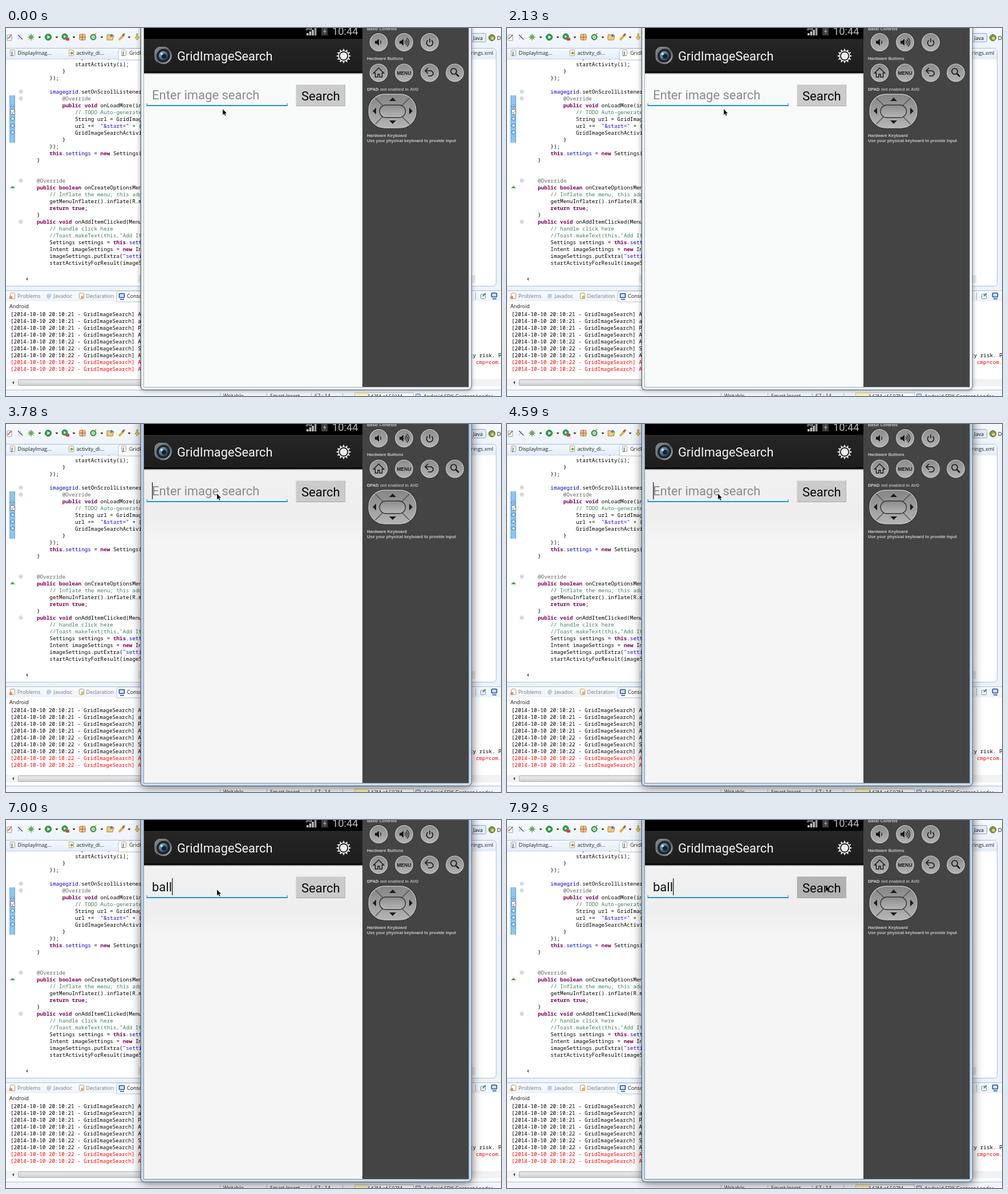
An HTML page with a canvas for the animation above (8000 ms loop, 868x645 px).

```html
<!DOCTYPE html>
<html lang="en">
<head>
<meta charset="utf-8">
<title>Image search</title>
<style>
html, body { margin: 0; width: 100%; height: 100%; overflow: hidden; background: #f1f5fa; }
canvas { display: block; }
</style>
</head>
<body>
<canvas id="stage" width="868" height="645"></canvas>
<script>
const g = document.getElementById('stage').getContext('2d');
const UI = '9.1px "Open Sans", sans-serif';
const MONO = '9.3px "Noto Sans Mono", monospace';
const APP = '22px Roboto, sans-serif';
const LABEL = 'bold 7.4px "Liberation Sans", sans-serif';
const CHAR = 5.58;

const box = (x, y, w, h, fill) => { g.fillStyle = fill; g.fillRect(x, y, w, h); };
const shape = (fill, stroke, width = 1) => {
  if (fill) { g.fillStyle = fill; g.fill(); }
  if (stroke) { g.strokeStyle = stroke; g.lineWidth = width; g.stroke(); }
};
const round = (x, y, w, h, r, fill, stroke, width) => {
  g.beginPath(); g.roundRect(x, y, w, h, r); shape(fill, stroke, width);
};
const disc = (x, y, r, fill, stroke, width) => {
  g.beginPath(); g.arc(x, y, r, 0, 7); shape(fill, stroke, width);
};
const poly = (x, y, points, fill, stroke, width, open) => {
  g.beginPath();
  for (let i = 0; i < points.length; i += 2) g.lineTo(x + points[i], y + points[i + 1]);
  if (!open) g.closePath();
  shape(fill, stroke, width);
};
const line = (x1, y1, x2, y2, stroke, width) => poly(x1, y1, [0, 0, x2 - x1, y2 - y1], null, stroke, width, true);
const text = (s, x, y, fill, font) => { g.font = font; g.fillStyle = fill; g.fillText(s, x, y); };
const fade = (x1, y1, x2, y2, ...colors) => {
  const f = g.createLinearGradient(x1, y1, x2, y2);
  colors.forEach((c, i) => f.addColorStop(i / (colors.length - 1), c));
  return f;
};

// Each row: indent in characters, then the code
const code = `16 startActivity(i);
12 }
8 });

8 imagegrid.setOnScrollListener(
12 @Override
12 public void onLoadMore(int
16 // TODO Auto-generated
16 String url = GridImage
16 url +=  "&start=" + (
16 GridImageSearchActivi
12 }
8 });
8 this.settings = new Settings(
4 }


4 @Override
4 public boolean onCreateOptionsMenu
8 // Inflate the menu; this adds
8 getMenuInflater().inflate(R.me
8 return true;
4 }
4 public void onAddItemClicked(MenuI
8 // handle click here
8 //Toast.makeText(this,"Add Item
8 Settings settings = this.setti
8 Intent imageSettings = new Int
8 imageSettings.putExtra("settin
8 startActivityForResult(imageSe`.split('\n');

const TOKEN = /\/\/.*|"[^"]*"?|@\w+|\b(?:public|void|boolean|return|true|this|new)\b|imagegrid|\.setti(?:ngs)?\b|[^\s"\/@]\w*|\S/g;
function codeStyle(s) {
  if (s.startsWith('//')) return ['#3f7f5f', ''];
  if (s[0] === '"') return ['#2a00ff', ''];
  if (s[0] === '@') return ['#646464', ''];
  if (/^(public|void|boolean|return|true|this|new)$/.test(s)) return ['#7f0055', 'bold '];
  if (/^(imagegrid|\.setti(ngs)?)$/.test(s)) return ['#0000c0', ''];
  return ['#000', ''];
}

function codeRow(row, y) {
  const [, indent, body] = row.match(/^(\d+) (.*)/) || [];
  if (!body) return;
  for (const m of body.matchAll(TOKEN)) {
    const [color, weight] = codeStyle(m[0]);
    text(m[0], 31.7 + (+indent + m.index) * CHAR, y, color, weight + MONO);
  }
}

function toolbar() {
  box(0, 0, 868, 35, fade(0, 0, 0, 35, '#f6f9fd', '#eef3fa'));
  round(2, 12, 8, 10, 1, '#fff', '#79a58a');
  line(3, 19, 10, 12, '#d33', 1.5);
  line(21, 12, 29, 20, '#334a70', 1.3);
  line(21, 20, 26, 12, '#8fa7cc');
  for (let a = 0; a < 4; a++) {
    const c = 6 * Math.cos(a * Math.PI / 4), s = 6 * Math.sin(a * Math.PI / 4);
    line(44 - c, 16 - s, 44 + c, 16 + s, '#47753f');
  }
  disc(44, 16, 3.5, '#6fab4d');
  disc(74, 16, 5.5, '#35a046', '#1e7f32');
  poly(72.5, 13, [0, 0, 5, 3, 0, 6], '#fff');
  disc(103, 15, 5, '#35a046', '#1e7f32');
  poly(101.5, 12.5, [0, 0, 4, 2.5, 0, 5], '#fff');
  box(105, 17, 6, 5, '#cf4540');
  round(129, 11, 10, 10, 1, '#f2c58c', '#b97a35');
  line(134, 10, 134, 22, '#a0602b'); line(128, 16, 140, 16, '#a0602b');
  disc(153, 16, 5, '#4aa85a', '#287d3c');
  disc(153, 16, 2, null, '#fff', 1.3);
  line(156, 12, 158, 9, '#d8a51f', 2);
  poly(177, 12, [0, 0, 4, -1, 5, 1, 12, 1, 10, 9, 0, 9], '#f1cc6e', '#a88332');
  disc(185, 13, 2.5, '#5b83c2');
  line(198, 21, 207, 12, '#e2b04e', 4);
  line(204, 14, 208, 10, '#8d6e49', 3);
  poly(226, 16, [0, 0, 4, 5, 8, 0, 5, 0, 5, -6, 3, -6, 3, 0], '#f5d15c', '#b08b27');
  for (const x of [59, 89, 119, 168, 216]) poly(x - 2.5, 15, [0, 0, 5, 0, 2.5, 3], '#222');
  round(814.5, 9.5, 27, 15, 2, '#e4eefa', '#8aa6cb');
  text('Java', 819, 20.5, '#111', UI);
  disc(852, 17, 5.5, '#7d9a42', '#4f6a2a');
  disc(853, 18, 2.5, '#e9d47a');
  text('Debug', 861, 20.5, '#111', UI);
}

function tabIcon(x, y, mark) {
  round(x + .5, y + .5, 8, 10, 1, '#fff', '#b59a62');
  if (mark) text(mark, x + 2, y + 9, '#2f5fa7', 'bold 9px "Open Sans", sans-serif');
}

function editor() {
  round(-6.5, 35.5, 866, 417, 6, '#fff', '#a9bdd8');
  g.save();
  g.beginPath(); g.rect(0, 55, 240, 380); g.clip();
  codeRow('16 i.putExtra("result", image', 55);
  code.forEach((row, i) => codeRow(row, 67 + 12 * i));
  g.restore();

  round(-6, 36, 865, 19, [0, 6, 0, 0], fade(0, 36, 0, 55, '#f4f8fe', '#e3edf9'));
  round(197, 36, 60, 20, [5, 5, 0, 0], '#fff', '#a9bdd8');
  line(0, 54.5, 197, 54.5, '#c3d3e8');
  tabIcon(7, 38, 'J'); text('DisplayImag...', 20.5, 47, '#222', UI);
  tabIcon(110, 38); disc(115, 44, 2.5, '#8bae50');
  text('activity_di...', 123.5, 47, '#222', UI);
  tabIcon(202, 38, 'J'); text('GridImage', 216, 47, '#222', UI);
  text('strings.xml', 808, 47, '#222', UI);

  box(6, 118, 10, 83, '#78b7ee');
  box(8, 118, 6, 83, '#8fc6f4');
  poly(7, 138, [0, 0, 8, 0, 4, -4], '#c7d4ff', '#5f74d0');
  round(7.5, 142.5, 8, 9, 1, '#fff', '#4a6a94');
  line(9, 147, 11, 150, '#b06a21'); line(11, 150, 15, 144, '#b06a21');
  for (const y of [159, 171, 183]) disc(11.5, y, 3, '#d9ecff', '#2b6fb1');
  poly(7, 281, [0, 0, 9, 0, 4.5, -4.5], '#3eaa52');
  for (const y of [111.5, 123.5, 267.5, 339.5]) {
    disc(26, y, 3, '#f7f9fc', '#b4bfca');
    line(24.5, y, 27.5, y, '#7f8e9d');
  }
  poly(35, 440, [0, 0, 3, -3, 3, 3], '#555');
  box(232, 433, 10, 14, '#e8eaec');
  box(814, 433, 9, 14, '#e8eaec');
}

function consoleView() {
  round(-6.5, 460.5, 880, 174, 6, '#fff', '#a9bdd8');
  box(0, 461, 868, 18, fade(0, 461, 0, 479, '#f8fbff', '#edf3fa'));
  round(194, 461, 60, 19, [5, 5, 0, 0], '#fff', '#a9bdd8');
  tabIcon(7, 464); box(6, 470, 5, 5, '#e48f55');
  text('Problems', 20, 473, '#777', UI);
  text('@', 71, 473, '#4d7cbb', UI);
  text('Javadoc', 83.5, 473, '#777', UI);
  tabIcon(128, 464); disc(134, 472, 3, '#e0b85f');
  text('Declaration', 140.5, 473, '#777', UI);
  round(198.5, 465.5, 9, 7, 1, '#cfe2fa', '#1f4a98', 1.6); box(200, 475, 7, 1.5, '#1f4a98');
  text('Console', 212, 473, '#111', UI);
  text('Android', 6, 491, '#111', UI);
  [...'AaPAASAAA'].forEach((c, i) =>
    text(`[2014-10-10 20:10:2${i < 4 ? 1 : 2} - GridImageSearch] ${c}`, 8, 505 + 12 * i, i < 7 ? '#000' : '#f00', MONO));
  text('ty risk. Pl', 813, 577, '#000', MONO);
  text('cmp=com.c', 824, 589, '#f00', MONO);
  line(823.5, 463, 823.5, 476, '#a9b3bf');
  round(832.5, 466.5, 8, 8, 1, '#f5f9fd', '#6d8cb5');
  line(836, 470, 841, 465, '#2f9452', 2);
  round(851.5, 464.5, 9, 7, 1, '#cfe2fa', '#1f4a98', 1.6); box(853, 474, 7, 1.5, '#1f4a98');
  box(0, 615, 868, 13, '#f1f2f4');
  poly(11, 621.5, [0, 0, 3, -3, 3, 3], '#444');
  round(21.5, 616.5, 300, 10, 1, fade(0, 616, 0, 627, '#efefef', '#cdcfd2'), '#a9acb0');
}

function statusLine(heap) {
  box(0, 636, 868, 9, '#f1f4f9');
  for (const x of [375, 457, 535, 590]) line(x + .5, 640, x + .5, 645, '#aab4c0');
  text('Writable', 381, 648, '#222', UI);
  text('Smart Insert', 463, 648, '#222', UI);
  text('67 : 14', 541, 648, '#222', UI);
  round(611.5, 639.5, 103, 10, 0, '#fff', '#b9c1cb');
  box(612, 640, 25, 5, '#fbf3b0');
  text(`142M of ${heap}M`, 634, 649, '#222', UI);
  round(718.5, 641.5, 8, 8, 1, '#cbd9ea', '#50739c');
  text('Android SDK Content Loader', 732, 649, '#222', UI);
}

function windowFrame(active) {
  g.save();
  g.shadowColor = active ? 'rgba(0,0,0,.6)' : 'rgba(0,0,0,.4)';
  g.shadowBlur = active ? 17 : 8;
  g.shadowOffsetX = active ? 1 : 0;
  g.shadowOffsetY = active ? 2 : 1;
  round(236, -20, 580, 654, 6, '#555');
  g.restore();
  round(236.5, -20, 579.5, 654, 6, active ? fade(0, 0, 0, 634, '#adc8e4', '#c3dbf3') : '#e9f0f7', '#4a5058');
  round(237.5, -20, 577.5, 653, 5, null, active ? '#e2effb' : '#fafcfe');
  box(241, 0, 571, 630, active ? '#87939f' : '#a9b0b7');
}

function gear(x, y) {
  for (let i = 0; i < 12; i++) {
    const a = i * Math.PI / 6, c = Math.cos(a), s = Math.sin(a);
    line(x + 9 * c, y + 9 * s, x + 12.3 * c, y + 12.3 * s, '#e8e8e8', 2.2);
  }
  disc(x, y, 9, null, '#eee', 1.6);
  disc(x, y, 6.3, '#eee');
}

function lens(x, y) {
  round(x - 15, y - 15, 26, 27, 9, '#77797b', '#a0a2a4');
  disc(x, y, 14.5, fade(x - 12, y - 12, x + 12, y + 12, '#8b8e90', '#4f5356', '#b5b8ba'), '#777');
  disc(x, y, 11.3, '#20272d', '#101417');
  disc(x, y, 8, fade(x - 6, y - 6, x + 6, y + 6, '#7ea9c3', '#1d3d56'));
  disc(x + 1, y + 1, 4, '#14232f');
  disc(x - 3, y - 3, 2, '#d6ebf5');
}

function phone(s) {
  box(242, 0, 383, 629, s.active ? '#f5f5f5' : '#f7faf9');
  if (s.active) box(242, 80, 383, 125, fade(0, 80, 0, 205, '#f1f1f1', '#efefef', '#eeeeee', '#f5f5f5'));
  box(242, 0, 383, 20, '#000');
  box(242, 19, 383, 59, fade(0, 19, 0, 78, '#262626', '#1d1d1d'));
  box(242, 76, 383, 3, '#0b0b0b');
  box(242, 79, 383, 2, fade(0, 79, 0, 81, '#888', '#ddd'));

  text('3G', 525, 4, '#bbb', 'bold 9px Roboto, sans-serif');
  for (let i = 0; i < 4; i++) box(527 + 4.6 * i, 9 - 3 * i, 3.6, 4 + 3 * i, i < 3 ? '#bbb' : '#999');
  box(553, 0, 11, 13, '#3c3c3c');
  poly(557, 0, [3, 0, -1, 7, 2, 7, 0, 12, 5, 5, 2, 5], '#999');
  text('10:44', 572, 12, '#bdbdbd', '18.3px Roboto, sans-serif');
  lens(276, 48.5);
  text('GridImageSearch', 300, 56.5, '#f4f4f4', '21.8px Roboto, sans-serif');
  gear(592, 49);

  if (s.patch) box(369, 129, 36, 38, '#f0f0f0');
  box(247, 135, 246.5, 2, '#2095cb');
  box(246.5, 132, 1.2, 5, '#2095cb');
  box(492.5, 132, 1.2, 5, '#2095cb');
  text(s.typed || 'Enter image search', 256, 125, s.typed ? '#111' : '#8b8b8b', APP);
  if (s.caret) box(Math.round(255.5 + (s.typed ? g.measureText(s.typed).width : 0)), 102, 1.3, 30, '#222');

  round(508.5, 99, 86.5, 38, 1, s.pressed ? '#b2b2b2' : '#cbcbcb');
  line(509, 99.5, 595, 99.5, s.pressed ? '#bbb' : '#dadada');
  line(509, 136.5, 595, 136.5, '#a5a5a5');
  line(594.5, 99, 594.5, 137, '#b4b4b4');
  text('Search', 518, 127, '#080808', APP);
}

function key(x, y) {
  disc(x, y, 16.5, '#2e2e2e');
  disc(x, y, 15.3, fade(0, y - 15, 0, y + 15, '#8c8c8c', '#b2b2b2'), '#c6c6c6', 1.3);
}

function speaker(x, y, waves) {
  poly(x, y, [-6, -2.5, -3, -2.5, 1, -6, 1, 6, -3, 2.5, -6, 2.5], '#161616');
  for (let i = 0; i < waves; i++) {
    g.beginPath(); g.arc(x + 1, y, 3.5 + 3 * i, -.9, .9); shape(null, '#161616', 1.3);
  }
}

function keypad() {
  box(625, 0, 186, 629, '#444');
  text('Basic Controls', 633, 3.5, '#c8c8c8', LABEL);
  text('Hardware Buttons', 633, 55.5, '#c8c8c8', LABEL);
  text('DPAD', 633, 109.5, '#d8d8d8', LABEL);
  text('not enabled in AVD', 656, 109.5, '#b4b4b4', LABEL);
  text('Hardware Keyboard', 633, 190.5, '#c8c8c8', LABEL);
  text('Use your physical keyboard to provide input', 633, 199.5, '#c8c8c8', LABEL);
  for (const x of [653.5, 698, 743]) { key(x, 25); key(x, 78.5); }
  key(787, 78.5);
  speaker(653, 25, 1);
  speaker(696, 25, 3);
  g.beginPath(); g.arc(743, 26, 5.5, -.9, 4.05); shape(null, '#161616', 1.6);
  line(743, 18.5, 743, 25, '#161616', 1.6);
  poly(653.5, 78, [-9, 1, 0, -8, 9, 1, 6, 1, 6, 8, 1.5, 8, 1.5, 3, -1.5, 3, -1.5, 8, -6, 8, -6, 1], null, '#161616', 1.4);
  text('MENU', 685.5, 82, '#161616', 'bold 8.5px "Liberation Sans", sans-serif');
  poly(743, 78, [-7, -3, 3, -3, 6, 0, 6, 3, 3, 6, -3, 6], null, '#161616', 1.6, true);
  poly(743, 78, [-3, -8, -8, -3, -3, 2], null, '#161616', 1.6, true);
  disc(785, 76, 5, null, '#161616', 1.7);
  line(789, 80, 794, 85, '#161616', 2.5);

  round(634.5, 114.5, 86, 62, 29, '#282828');
  round(636, 116, 83, 59, 28, fade(0, 116, 0, 175, '#858585', '#b4b4b4'), '#c4c4c4', 1.3);
  for (const sx of [-1, 1]) for (const sy of [-1, 1])
    line(677.5 + sx * 17, 145.5 + sy * 10, 677.5 + sx * 30, 145.5 + sy * 23, '#4d4d4d', 1.3);
  round(655, 135, 45.5, 22, 11, fade(0, 135, 0, 157, '#8c8c8c', '#b6b6b6'), '#333', 1.3);
  poly(678, 122, [-6, 6, 6, 6, 0, 0], '#1b1b1b');
  poly(678, 168, [-6, -6, 6, -6, 0, 0], '#1b1b1b');
  poly(643, 145.5, [0, 0, 6, -6, 6, 6], '#1b1b1b');
  poly(713, 145.5, [0, 0, -6, -6, -6, 6], '#1b1b1b');
}

const pointer = ([x, y]) => poly(x, y, [0, 0, 0, 10.5, 2.4, 8.3, 4, 12, 5.7, 11.2, 4.1, 7.8, 7.2, 7.5], '#000', 'rgba(255,255,255,.5)', .6);

// Times in ms; the last entry already reached applies
const moves = [[0, [380, 142]], [3510, [370, 122]], [7260, [475, 86]], [7410, [605, 86]], [7550, [580, 102]], [7670, [559, 115]]];
const typing = [[0, ''], [5640, 'b'], [6020, 'ba'], [6850, 'bal'], [7000, 'ball']];
const blinks = [400, 930, 1510, 2130, 2560, 3090, 3630, 4070, 4590, 6570, 6850, 7550, 7920];
const at = (steps, t) => steps.findLast(step => step[0] <= t)[1];

function draw(t) {
  box(0, 0, 868, 645, '#eef3f9');
  toolbar();
  editor();
  consoleView();
  statusLine(t < 1050 ? 501 : 507);
  windowFrame(t >= 3780);
  phone({
    active: t >= 3780,
    patch: t >= 3630 && t < 3780,
    pressed: t >= 7920,
    typed: at(typing, t),
    caret: blinks.filter(b => b <= t).length % 2
  });
  keypad();
  pointer(at(moves, t));
}

const start = performance.now();
function tick() {
  draw((performance.now() - start) % 8000);
  requestAnimationFrame(tick);
}
tick();
</script>
</body>
</html>
```
